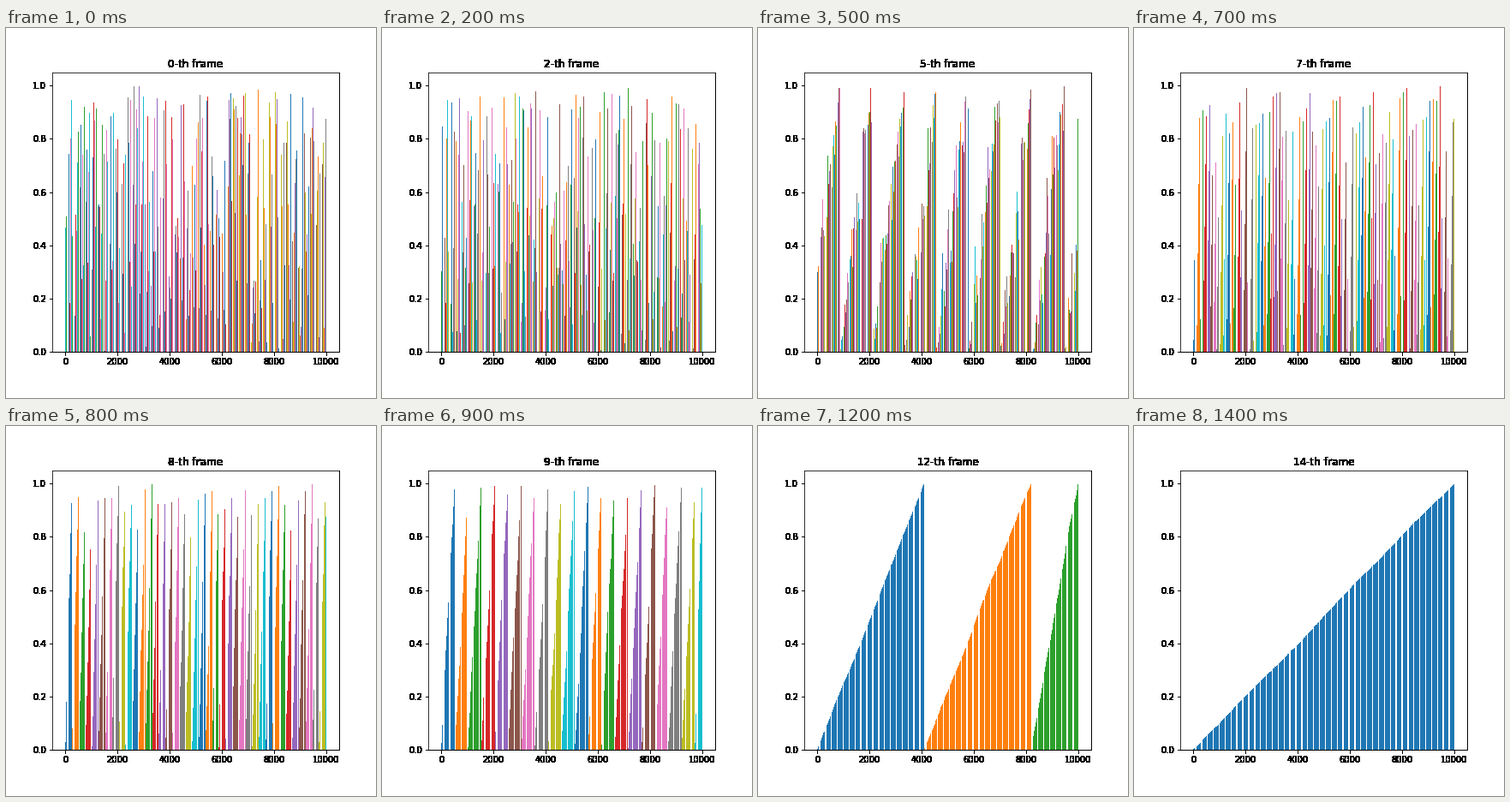
Recreate the animation shown at these times as a matplotlib script. Size 432x432 px, loop 1.5 s.

```python
import numpy as np
import matplotlib.pyplot as plt
from matplotlib.animation import FuncAnimation

COUNT = 10000
STEPS = 15
SIZE = 432
LEFT, RIGHT, BOTTOM, TOP = 0.125, 0.9, 0.125, 0.88
BAR_WIDTH = 0.8

# Axis range with the usual 5 % margin around the bars.
span = COUNT - 1 + BAR_WIDTH
x_min = -BAR_WIDTH / 2 - 0.05 * span
x_max = COUNT - 1 + BAR_WIDTH / 2 + 0.05 * span
units_per_px = (x_max - x_min) / (SIZE * (RIGHT - LEFT))

values = np.random.default_rng(7).random(COUNT)


def merged(step):
    """Values after `step` merge passes: sorted runs of 2**step items."""
    run = 2 ** step
    return np.concatenate([np.sort(values[i:i + run])
                           for i in range(0, COUNT, run)])


def solid(image, dpi):
    """Turn every touched pixel fully black."""
    image[..., :3] = 0
    image[..., 3] = image[..., 3] > 0
    return image, 0, 0


fig = plt.figure(figsize=(6, 6), dpi=72, facecolor="white")
fig.subplots_adjust(left=LEFT, right=RIGHT, bottom=BOTTOM, top=TOP)
ax = fig.add_subplot()

# Bars are far thinner than a pixel: only those that cross the
# snapping edge of a pixel column show up, so only they are drawn.
edges = np.arange(SIZE) + 0.5 - SIZE * LEFT
shown = np.rint(edges * units_per_px + x_min).astype(int)
shown = shown[(shown >= 0) & (shown < COUNT)]
bars = ax.bar(shown, values[shown], BAR_WIDTH, linewidth=0)

ax.set_xlim(x_min, x_max)
ax.set_ylim(0, 1.05 * values.max())
title = ax.set_title("")
for part in (title, ax.xaxis, ax.yaxis, ax.spines["right"], ax.spines["bottom"]):
    part.set_agg_filter(solid)

passes = [merged(step)[shown] for step in range(STEPS)]


def update(step):
    runs = shown // 2 ** step
    for bar, height, run in zip(bars, passes[step], runs):
        bar.set_height(height)
        bar.set_facecolor(f"C{run % 10}")
    title.set_text(f"{step}-th frame")
    return [*bars, title]


anim = FuncAnimation(fig, update, frames=STEPS, interval=100, repeat=True)
plt.show()
```
